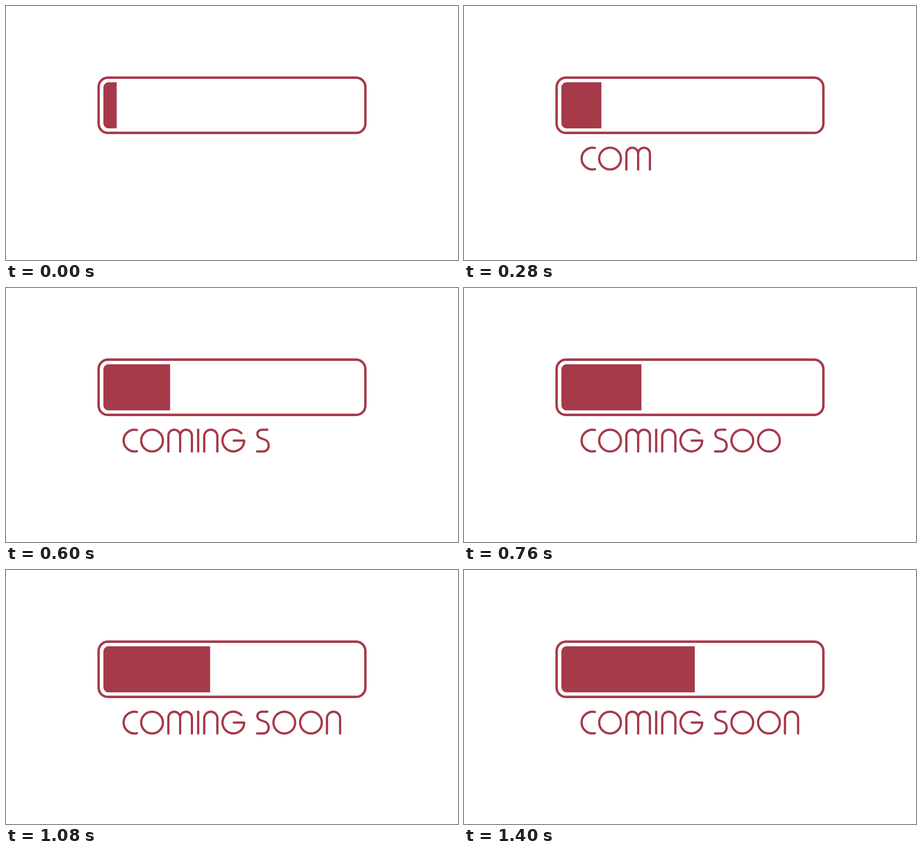
Recreate the animation shown at these times as an HTML page. Size 998 by 561 pixels, loop 1480 ms.

```html
<!DOCTYPE html>
<html lang="en">
<head>
<meta charset="utf-8">
<title>Coming soon</title>
<style>
  html, body { margin: 0; width: 100%; height: 100%; overflow: hidden; background: #fff; }
  svg { display: block; width: 998px; height: 561px; }
  .line { fill: none; stroke: #a63a4b; stroke-linecap: round; stroke-linejoin: round; }
  #frame { stroke-width: 5.4; }
  #word { stroke-width: 5; }
  #bar { fill: #a63a4b; }
</style>
</head>
<body>
<svg viewBox="0 0 998 561" role="img" aria-label="Coming soon">
  <rect id="frame" class="line" x="204.5" y="158.3" width="589" height="122" rx="20.5"/>
  <rect id="bar" x="215" y="168.2" width="589" height="102.3" rx="12"/>
  <g id="word" class="line"></g>
</svg>
<script>
const LOOP = 1480, STEP = 80, LAST = 18;
const TOP = 313, MID = 337, BASE = 361;
const BAR_WIDTH = 589, BAR_STEP = 14.73;

// Single-stroke letter shapes
const ring = cx => `M${cx - 24} ${MID}a24 24 0 1 1 48 0a24 24 0 1 1 -48 0z`;
const arch = (x, r) => `M${x} ${BASE}V${TOP + r}a${r} ${r} 0 0 1 ${2 * r} 0V${BASE}`;
const letters = [
  'M289 313.6A24 24 0 1 0 289 360.4',
  ring(322.5),
  arch(358.5, 13) + arch(384.5, 13),
  `M424.3 ${TOP}V${BASE}`,
  arch(437.7, 14.5),
  `M519.6 320.6A24 24 0 1 0 526 ${MID}H503`,
  `M577 ${TOP}H565.5C559 313 555 317.5 555 322.5C555 328 558.5 330.5 563 332` +
    `L571.5 335C577 337 580 342.5 580 348C580 355.5 575 361 568 361H554.5`,
  ring(614.5),
  ring(673.3),
  arch(708.7, 14.5)
];

// Plays value(k) for every step k, held without blending
function play(el, prop, value) {
  const keys = [];
  for (let k = 0; k <= LAST; k++) {
    const time = k ? k * STEP - STEP / 2 : 0;
    keys.push({ offset: time / LOOP, [prop]: value(k), easing: 'step-end' });
  }
  keys.push({ offset: 1, [prop]: value(LAST) });
  el.animate(keys, { duration: LOOP, iterations: Infinity });
}

const word = document.getElementById('word');
letters.forEach((d, i) => {
  const path = document.createElementNS('http://www.w3.org/2000/svg', 'path');
  path.setAttribute('d', d);
  word.append(path);
  play(path, 'opacity', k => k >= i + 2 ? 1 : 0);
});

// The finished word blinks
play(word, 'opacity', k => k === 15 || k === 17 ? 0 : 1);

play(document.getElementById('bar'), 'clipPath',
  k => `inset(0px ${(BAR_WIDTH - BAR_STEP * (k + 2)).toFixed(2)}px 0px 0px)`);
</script>
</body>
</html>
```
